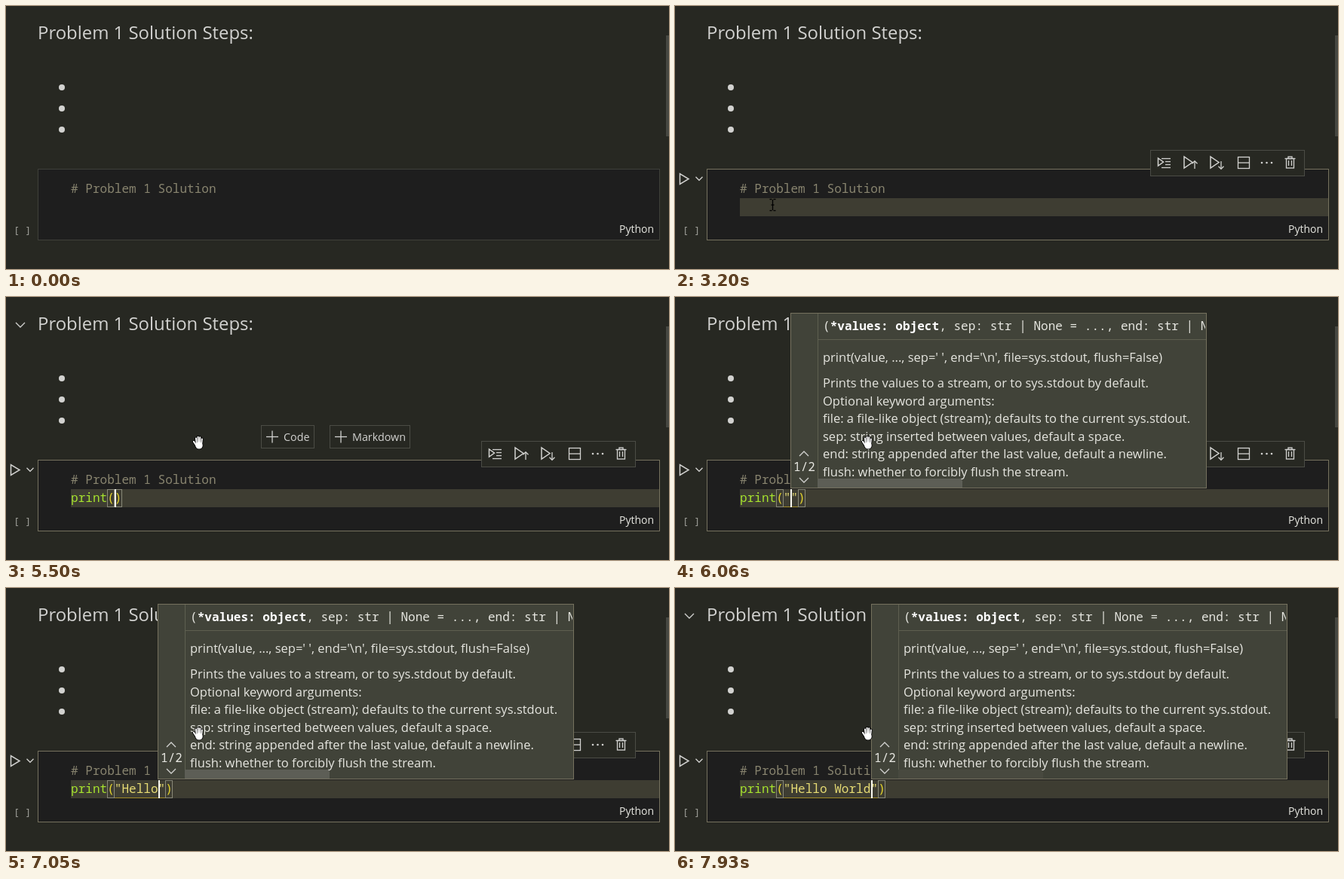
An HTML page with a canvas for the animation above (8000 ms loop, 879x349 px).

```html
<!DOCTYPE html>
<html lang="en">
<head>
<meta charset="utf-8">
<title>Notebook typing</title>
<style>
  html, body { margin: 0; width: 100%; height: 100%; overflow: hidden; background: #272822; }
  canvas { display: block; }
</style>
</head>
<body>
<canvas id="stage" width="879" height="349"></canvas>
<script>
const ctx = document.getElementById('stage').getContext('2d');
const LOOP = 8000, TICK = 110, LAG = 105, CLICK = 2200, KEY_GAP = 165, BLINK = 535;
const SANS = '"Open Sans", "Noto Sans", sans-serif';
const MONO = '"Noto Sans Mono", "DejaVu Sans Mono", monospace';
const CODE = `16.06px ${MONO}`, ADV = 9.64, LEFT = 86;
const BG = '#272822', FG = '#d2d2d0', BRIGHT = '#e6e6e0';
const EDGE = '#75715e', FRAME = '#4b4c45', PANEL = '#414339', RULE = '#5e5f50';

// Runs of keys, each typed at a steady pace from its start time.
const BURSTS = { 'print': 4520, '(': 5500, '"': 5830, 'Hello ': 6280, 'World': 7160 };
const WORDS = ['print', 'property', 'pow', 'pass', 'help', 'hex', 'hash', 'hasattr'];
const DOCS = [
  'Prints the values to a stream, or to sys.stdout by default.',
  'Optional keyword arguments:',
  'file: a file-like object (stream); defaults to the current sys.stdout.',
  'sep: string inserted between values, default a space.',
  'end: string appended after the last value, default a newline.',
  'flush: whether to forcibly flush the stream.'
];

const clamp = v => Math.min(1, Math.max(0, v));
const mix = (a, b, k) => Math.round(a + (b - a) * k);
const ease = k => k * k * (3 - 2 * k);
const range = (n, fn) => Array.from({ length: n }, (_, i) => fn(i));

const textAt = t => Object.entries(BURSTS)
  .map(([keys, start]) => keys.slice(0, Math.max(0, Math.floor((t - start) / KEY_GAP) + 1)))
  .join('');
const caretX = text => Math.round(LEFT + text.length * ADV);
const popupX = text => Math.floor(LEFT - 1 + text.length * 9.73);
const lastWord = text => text.match(/[a-z]*$/i)[0].toLowerCase();
const matches = word => word ? WORDS.filter(w => w.startsWith(word)) : [];
const caretOn = t => t >= 4300 || Math.floor((t - CLICK + 10) / BLINK) % 2 === 0;

// Enters from below, arcs over the heading into the cell, later returns to the heading.
function mouseAt(t) {
  if (t < 990) return null;
  const s = Math.floor(t / TICK) * TICK;
  const enter = ease(clamp((s - 990) / 780)), leave = ease(clamp((s - 3190) / 880));
  if (leave) return { x: mix(129, 255, leave), y: mix(264, 193, leave) };
  return { x: mix(330, 129, enter), y: mix(322, 264, enter) - Math.round(130 * Math.sin(Math.PI * enter)) };
}

function fill(x, y, w, h, color) {
  ctx.fillStyle = color;
  ctx.fillRect(x, y, w, h);
}

function box(x, y, w, h, edge, color) {
  if (color) fill(x, y, w, h, color);
  ctx.strokeStyle = edge;
  ctx.lineWidth = 1;
  ctx.strokeRect(x + .5, y + .5, w - 1, h - 1);
}

function label(str, x, y, font, color) {
  ctx.font = font;
  ctx.fillStyle = color;
  ctx.fillText(str, x, y);
}

function path(points, color = FG, width = 1.3) {
  ctx.strokeStyle = color;
  ctx.lineWidth = width;
  ctx.beginPath();
  for (const [x, y] of points) ctx.lineTo(x, y);
  ctx.stroke();
}

const across = (x, y, w, color, width) => path([[x, y], [x + w, y]], color, width);
const down = (x, y, h, color, width) => path([[x, y], [x, y + h]], color, width);
const chevron = (x, y, size, dir = 1) =>
  path([-1, 0, 1].map(i => [x + i * size, y + dir * size * (.5 - Math.abs(i))]));
const play = (x, y, w, h) => path([[x, y], [x, y - h], [x + w, y], [x, y + h], [x, y]], FG, 1.5);

function dot(x, y, r) {
  ctx.fillStyle = FG;
  ctx.beginPath();
  ctx.arc(x, y, r, 0, 7);
  ctx.fill();
}

function outline(x, y, w, h) {
  ctx.strokeStyle = FG;
  ctx.lineWidth = 1.3;
  ctx.strokeRect(x, y, w, h);
}

function cube(x, y) {
  const corner = i => [x + 8 * Math.sin(i * Math.PI / 3), y + 8 * Math.cos(i * Math.PI / 3)];
  path(range(7, corner), BRIGHT, 1.4);
  for (const i of [0, 2, 4]) path([[x, y], corner(i)], BRIGHT, 1.4);
}

function page() {
  fill(0, 0, 879, 349, BG);
  label('Problem 1 Solution Steps:', 42, 44, `23.9px ${SANS}`, FG);
  range(3, i => dot(74, 108 + 28 * i, 4));
  fill(875, 39, 4, 134, '#474842');
}

function cell(focused, hovered) {
  box(42, 216, 825, 95, focused ? EDGE : '#3f403a', '#1e1e1e');
  label('# Problem 1 Solution', LEFT, 248, CODE, '#88846f');
  label('[ ]', 10, 302, `13px ${MONO}`, '#a0a09a');
  label('Python', 813, 301, `14px ${SANS}`, BRIGHT);
  if (focused || hovered) {
    play(6.5, 229.5, 11.5, 7);
    chevron(32, 229, 4.5);
  }
}

function toolbar() {
  box(630, 191, 205, 35, FRAME, BG);
  play(640.5, 207, 7, 5);
  range(4, i => across(i % 3 ? 650 : 645, 202.5 + 4 * i, i % 3 ? 7 : 12));
  for (const dir of [-1, 1]) {
    const x = 692.5 + 17.5 * dir;
    play(x, 207.5, 11, 7.5);
    down(x + 14, 206, 10);
    chevron(x + 14, 211 + 3.5 * dir, 3.5, dir);
  }
  outline(746.5, 200.5, 15, 15);
  across(746.5, 208, 15);
  range(3, i => dot(778 + 6.5 * i, 208, 1.3));
  across(808.5, 202.5, 14);
  outline(813, 200, 5, 2.5);
  outline(810.5, 202.5, 10, 12.5);
  range(2, i => down(813.5 + 4 * i, 205, 7));
}

function addButton(x, w, name) {
  box(x, 170, w, 31, FRAME, BG);
  across(x + 7, 185.5, 16);
  down(x + 15, 177.5, 16);
  label(name, x + 30, 191, `14.3px ${SANS}`, FG);
}

function codeLine(text, showCaret) {
  fill(LEFT, 255, 780, 24, '#3e3d32');
  const x = i => LEFT + i * ADV;
  const open = text.indexOf('(');
  label(text.slice(0, 5), LEFT, 272, CODE, '#a6e22e');
  if (open >= 0) {
    const inner = text.slice(open + 1), str = inner && inner + '"';
    const close = open + 1 + str.length;
    if (str) fill(x(open), 278, x(close + 1) - x(open), 1, '#a08a28');
    for (const i of [open, close]) box(Math.round(x(i)), 255, 10, 24, '#888878');
    label('(', x(open), 272, CODE, '#e3d32c');
    label(str, x(open + 1), 272, CODE, '#e6db74');
    label(')', x(close), 272, CODE, '#e3d32c');
  }
  if (showCaret) fill(caretX(text), 255, 2, 24, '#f8f8f0');
}

function suggestions(x, word, items) {
  box(x, 278, 540, items.length * 25 + 4, EDGE, BG);
  items.forEach((item, i) => {
    const y = 280 + i * 25;
    if (!i) fill(x + 2, y, 536, 24, PANEL);
    cube(x + 13, y + 11);
    label(word, x + 29, y + 16, `bold ${CODE}`, '#ffffff');
    label(item.slice(word.length), x + 29 + word.length * ADV, y + 16, CODE, BRIGHT);
  });
}

function signature(x, hovered) {
  const bold = '*values: object', left = x + 43, font = `16.5px ${SANS}`;
  box(x, 21, 552, 233, EDGE, PANEL);
  fill(x + 36, 22, 1, 231, RULE);
  fill(x + 37, 56, 514, 1, RULE);
  fill(x + 36, 241, 192, 12, hovered ? '#5d5e56' : '#48493f');
  ctx.save();
  ctx.beginPath();
  ctx.rect(x + 37, 22, 513, 231);
  ctx.clip();
  label('(', left, 44, CODE, BRIGHT);
  label(bold, left + ADV, 44, `bold ${CODE}`, '#ffffff');
  label(', sep: str | None = ..., end: str | None', left + ADV * (bold.length + 1), 44, CODE, BRIGHT);
  label("print(value, ..., sep=' ', end='\\n', file=sys.stdout, flush=False)", left, 86, font, BRIGHT);
  DOCS.forEach((line, i) => label(line, left, Math.round(120 + 23.6 * i), font, BRIGHT));
  ctx.restore();
  chevron(x + 18, 208, 6, -1);
  label('1/2', x + 4, 231, CODE, BRIGHT);
  chevron(x + 18, 243, 6);
}

// A dark, wider pass first leaves an outline around the white fingers and palm.
function hand(x, y) {
  ctx.save();
  ctx.translate(x, y);
  ctx.lineCap = 'round';
  for (const [color, grow] of [['#000000', 1.7], ['#ffffff', 0]]) {
    path([[-6, -1], [-2, 5]], color, 2.2 + grow);
    range(4, i => path([[-3 + 2.6 * i, -5.5 - 2 * Math.sin(i * 1.2)], [-2 + 2 * i, 4]], color, 2 + grow));
    ctx.fillStyle = color;
    ctx.beginPath();
    ctx.ellipse(1, 4, 4.7 + grow / 2, 4.5 + grow / 2, 0, 0, 7);
    ctx.fill();
  }
  ctx.restore();
}

function beam(x, y) {
  down(x + .5, y - 7, 14, '#000000');
  for (const dir of [-1, 1]) {
    across(x - 3.5, y + 7.5 * dir, 3, '#000000');
    across(x + 1.5, y + 7.5 * dir, 3, '#000000');
  }
  across(x - 1.5, y, 4, '#000000');
}

function draw(t) {
  const mouse = mouseAt(t), text = textAt(t), late = textAt(t - LAG);
  const focused = t >= CLICK;
  const sigX = late.includes('(') ? popupX(late) : Infinity;
  const onSig = !!mouse && sigX < mouse.x;

  page();
  if (mouse && mouse.y < 204 && !onSig) {
    chevron(19, 37, 6);
    if (focused) {
      addButton(338, 71, 'Code');
      addButton(429, 107, 'Markdown');
    }
  }
  cell(focused, mouse && mouse.y > 215 && mouse.y < 311);
  if (focused) {
    codeLine(text, caretOn(t));
    toolbar();
  }
  const word = lastWord(late), items = matches(word);
  if (items.length && matches(lastWord(text)).length) suggestions(popupX(late), word, items);
  if (sigX < Infinity) signature(sigX, onSig);
  if (mouse) (mouse.y < 204 ? hand : beam)(mouse.x, mouse.y);
}

function frame() {
  draw(performance.now() % LOOP);
  requestAnimationFrame(frame);
}
frame();
</script>
</body>
</html>
```
